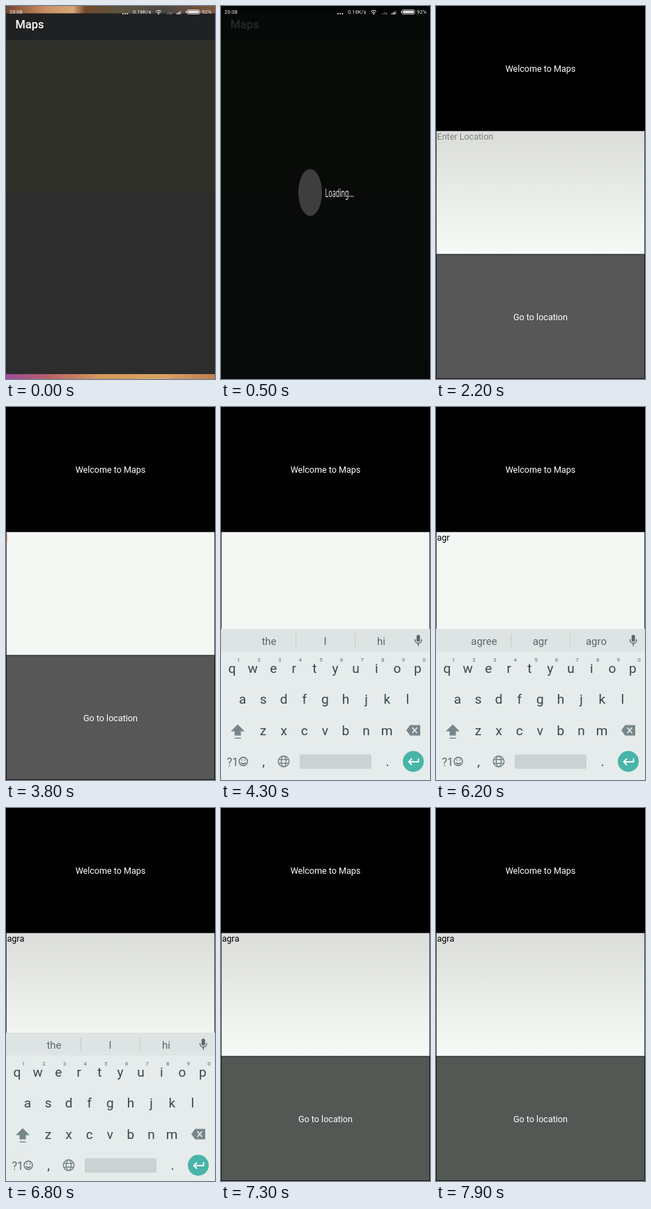
An HTML page for the animation above (8000 ms loop, 300 by 533 pixels).

```html
<!DOCTYPE html>
<html lang="en">
<head>
<meta charset="utf-8">
<title>Location search</title>
<style>
  html, body { margin: 0; height: 100%; overflow: hidden; background: #000; }
  svg { display: block; width: 100%; height: 100%; }
  text { font-family: Roboto, sans-serif; font-size: 12.55px; white-space: pre; }
  .mid text, text.mid { text-anchor: middle; }
  #status text { font-size: 7.5px; }
  #keys { font-size: 19px; fill: #37474f; }
  #keys text { font-size: inherit; }
  #digits { font-size: 8px; font-weight: 500; fill: #78868a; }
  #words { font-size: 15px; fill: #59676b; }
  #words text { font-size: inherit; }
</style>
</head>
<body>
<svg viewBox="0 0 300 533">
  <defs>
    <linearGradient id="field" x2="0" y2="1">
      <stop stop-color="#dbddda"/><stop offset="1" stop-color="#f7fbf8"/>
    </linearGradient>
    <linearGradient id="wallTop">
      <stop stop-color="#70452f"/><stop offset=".18" stop-color="#c98c60"/>
      <stop offset=".32" stop-color="#d9a878"/><stop offset=".38" stop-color="#70482c"/>
      <stop offset=".55" stop-color="#5a5640"/><stop offset=".75" stop-color="#4a4540"/>
      <stop offset="1" stop-color="#80573e"/>
    </linearGradient>
    <linearGradient id="wallBottom">
      <stop stop-color="#9a4c98"/><stop offset=".2" stop-color="#b8606c"/>
      <stop offset=".45" stop-color="#d29a5c"/><stop offset=".75" stop-color="#d8a468"/>
      <stop offset="1" stop-color="#c07c50"/>
    </linearGradient>
    <filter id="shadow" x="-20%" y="-10%" width="140%" height="125%">
      <feDropShadow dx="0" dy="1" stdDeviation="1.2" flood-opacity=".45"/>
    </filter>
  </defs>
  <rect width="300" height="533"/>

  <g id="launch">
    <rect width="300" height="533" fill="#020503"/>
    <g id="splash">
      <rect y="10" width="300" height="39" fill="#1f2123"/>
      <rect y="48.5" width="300" height="219" fill="#2f302a"/>
      <rect y="267" width="300" height="266" fill="#2d2d2d"/>
      <text x="13.5" y="32" fill="#fff" style="font-size:16.4px;font-weight:500">Maps</text>
    </g>
    <g id="wall">
      <rect width="300" height="10.5" fill="url(#wallTop)"/>
      <rect y="526" width="300" height="7" fill="url(#wallBottom)"/>
    </g>
    <g id="loading">
      <ellipse cx="128" cy="266.5" rx="17" ry="33.5" fill="#3e3e3e"/>
      <g transform="translate(149.5 273) scale(1 1.85)">
        <text fill="#e4e4e4" style="font:9px 'Noto Sans',sans-serif">Loading...</text>
      </g>
    </g>
    <g id="status" fill="#eee">
      <text x="5" y="11.3">20:08</text>
      <text x="182" y="11.3">0.16K/s</text>
      <text x="281" y="11.3">92%</text>
      <circle cx="168" cy="11" r="1"/><circle cx="171.2" cy="11" r="1"/><circle cx="174.4" cy="11" r="1"/>
      <path d="M215 8q4-3.4 8 0M216.4 9.8q2.6-2.2 5.2 0" fill="none" stroke="#eee"/>
      <circle cx="219" cy="11.3" r="1"/>
      <path d="M230 12v-1h1v1zm2 0v-2h1v2zm2 0v-3.500h1v3.500z" opacity=".4"/>
      <path d="M236 9.500l2.500 2.500m0-2.500l-2.500 2.500" stroke="#ccc" stroke-width=".6"/>
      <path d="M244.500 12v-1.500h1.300v1.500zm2 0v-2.500h1.300v2.500zm2 0v-4h1.300v4z"/>
      <path d="M250.500 12v-5h1.300v5z" opacity=".4"/>
      <rect x="260" y="5.500" width="18" height="6" rx="1.500" fill="none" stroke="#eee" stroke-width=".8"/>
      <rect x="261.300" y="6.800" width="15.400" height="3.400" rx=".5"/>
      <rect x="258.400" y="7" width="1" height="3"/>
    </g>
  </g>

  <g id="app">
    <rect width="300" height="533"/>
    <text class="mid" x="150" y="93.500" fill="#fff">Welcome to Maps</text>
    <rect id="box" x=".5" y="178.500" width="299" height="176.500" stroke="#333" stroke-width=".7"/>
    <text id="entry" x="1.500" y="191"></text>
    <rect id="cursor" y="181" width="1" height="13" fill="#f08078"/>
    <rect id="button" x=".5" y="355" width="299" height="177.500" stroke="#111" stroke-width=".8"/>
    <text class="mid" x="150" y="448.500" fill="#fff">Go to location</text>
    <g id="board">
      <rect y="317" width="300" height="220" fill="#e6eceb"/>
      <rect y="317" width="300" height="32.500" fill="#dee4e3"/>
      <path d="M107.500 324v19M192.500 324v19" stroke="#c3cbcb"/>
      <g id="words" class="mid"></g>
      <g fill="none" stroke="#59676b" stroke-width="1.500">
        <path d="M278.500 332v1a4.700 4.700 0 0 0 9.400 0v-1M283.200 338v3.500"/>
        <path d="M283.200 328v5" stroke-width="5" stroke-linecap="round"/>
      </g>
      <g id="keys" class="mid"><g id="digits"></g></g>
      <g fill="#77868a">
        <path d="M24 453.500l10 10h-5.500v6h-9v-6h-5.500zM19.500 472.500h9v1.500h-9z"/>
        <path d="M266 462l5.500-7.500h14.500v15h-14.500z"/>
        <path d="M274.500 458l7 8m0-8l-7 8" stroke="#e6eceb" stroke-width="1.700"/>
      </g>
      <text x="8.500" y="513" fill="#59676b" style="font-size:16px">?1</text>
      <g fill="none" stroke="#59676b" stroke-width="1.300">
        <circle cx="32" cy="506.500" r="6"/>
        <path d="M28.500 508q3.500 4 7 0"/>
        <path d="M29.800 503.500v2M34.200 503.500v2"/>
      </g>
      <g fill="none" stroke="#77868a" stroke-width="1.500">
        <circle cx="90" cy="506.500" r="7.700"/>
        <ellipse cx="90" cy="506.500" rx="3.500" ry="7.700"/>
        <path d="M83 503.800h14M83 509.200h14"/>
      </g>
      <rect x="113" y="496.500" width="103" height="20.500" rx="2" fill="#cbd2d2"/>
      <circle cx="276" cy="506.500" r="15" fill="#48b5a8"/>
      <path d="M283.500 502v5h-14m4.500-4.500l-4.500 4.500l4.500 4.500" fill="none" stroke="#fff" stroke-width="1.800"/>
      <g id="popup">
        <rect x="-16.500" y="-77" width="33" height="96" rx="3" fill="#cfd7d6" filter="url(#shadow)"/>
        <text id="pressed" class="mid" y="-46" fill="#37474f" style="font-size:24px"></text>
      </g>
    </g>
  </g>
</svg>
<script>
const $ = id => document.getElementById(id);
const LOOP = 8000, STEP = 100, PITCH = 29.6;
const clamp = x => Math.max(0, Math.min(1, x));
const show = (id, on) => $(id).setAttribute('visibility', on ? 'inherit' : 'hidden');
const move = (id, x, y) => $(id).setAttribute('transform', `translate(${x} ${y})`);

function addText(parent, x, y, string) {
  const el = document.createElementNS('http://www.w3.org/2000/svg', 'text');
  el.setAttribute('x', x);
  el.setAttribute('y', y);
  el.textContent = string;
  $(parent).append(el);
  return el;
}

// Key centres, by letter
const keyPos = {};
[['qwertyuiop', 16, 374], ['asdfghjkl', 31, 418], ['zxcvbnm', 60.5, 463]].forEach(([row, x0, y]) =>
  [...row].forEach((letter, i) => {
    const x = x0 + i * PITCH;
    keyPos[letter] = [x, y];
    addText('keys', x, y + 6, letter);
  }));
[...'1234567890'].forEach((d, i) => addText('digits', 25 + i * PITCH, 364, d));
addText('keys', 61, 513, ',');
addText('keys', 239, 513, '.');
const words = [69, 149.5, 230].map(x => addText('words', x, 339.5, ''));

const FOCUS = 3500, BLUR = 6700;
const presses = [['a', 4600], ['g', 5400], ['r', 5900], ['a', 6300]];
const hints = {
  '': ['the', 'I', 'hi'],
  a: ['and', 'A', 'as'],
  ag: ['ago', 'ag', 'age'],
  agr: ['agree', 'agr', 'agro'],
  agra: ['agree', 'agra', 'agrarian']
};

function boardOffset(t) {
  if (t < BLUR) return 217 * (1 - clamp((t - 3850) / 400)) ** 2;
  return Math.min(217, 4 * ((t - BLUR) / 100) ** 4.5);
}

function drawLaunch(t) {
  $('splash').setAttribute('opacity', t < 600 ? 1 - 0.85 * clamp((t - 100) / 400) : 0);
  show('wall', t < 100);
  show('status', t < 600);
  show('loading', t >= 300);
}

function drawApp(t) {
  const focused = t >= FOCUS && t < BLUR;
  const typed = presses.filter(p => t >= p[1] + 100).map(p => p[0]).join('');
  const down = presses.find(p => t >= p[1] && t < p[1] + 100);
  const hinting = !typed && !focused;

  $('box').setAttribute('fill', focused ? '#f4f8f5' : 'url(#field)');
  $('button').setAttribute('fill', t < 7000 ? '#575757' : '#535854');
  $('entry').textContent = hinting ? 'Enter Location' : typed;
  $('entry').setAttribute('fill', hinting ? '#7d807d' : '#000');

  show('cursor', focused && (t - FOCUS) % 1000 < 500);
  $('cursor').setAttribute('x', typed ? 2 + $('entry').getComputedTextLength() : 0.7);

  const offset = boardOffset(t);
  show('board', offset < 216);
  move('board', 0, offset);
  hints[focused ? typed : ''].forEach((word, i) => words[i].textContent = word);

  show('popup', down && offset < 216);
  if (down) {
    move('popup', ...keyPos[down[0]]);
    $('pressed').textContent = down[0];
  }
}

const start = performance.now();
function frame() {
  const elapsed = (performance.now() - start) % LOOP;
  const t = Math.floor(elapsed / STEP) * STEP;
  const running = t >= 2200;
  $('launch').style.display = running ? 'none' : '';
  $('app').style.display = running ? '' : 'none';
  (running ? drawApp : drawLaunch)(t);
  requestAnimationFrame(frame);
}
frame();
</script>
</body>
</html>
```
